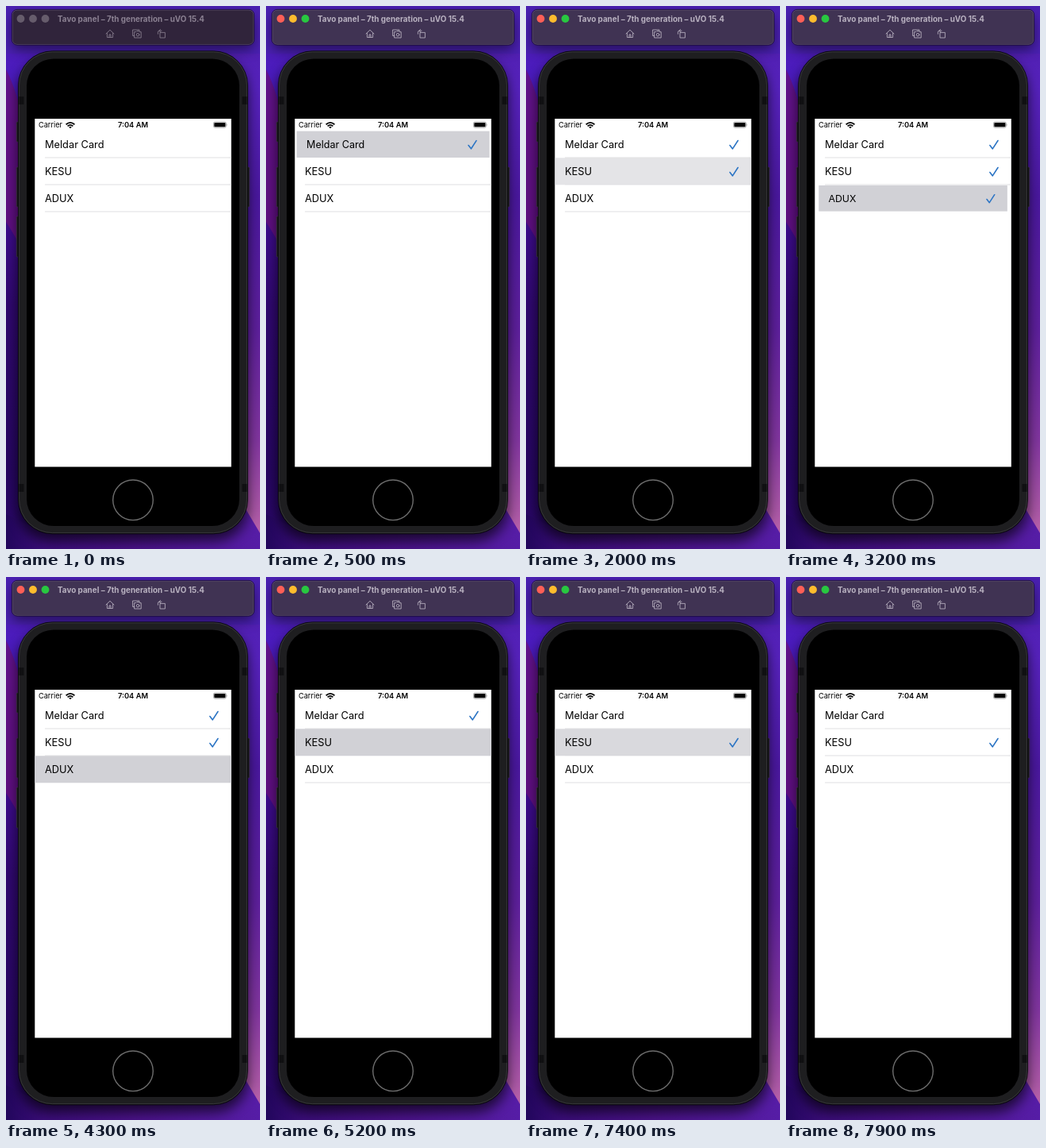
Recreate the animation shown at these times as an HTML page. Size 320 by 684 pixels, loop 8000 ms.

```html
<!DOCTYPE html>
<html lang="en">
<head>
<meta charset="utf-8">
<title>Selectable card list</title>
<style>
  html, body { margin: 0; width: 100%; height: 100%; overflow: hidden; background: #3c149a; }
  svg { display: block; width: 100%; height: 100%; font-family: Inter, Roboto, sans-serif; }
</style>
</head>
<body>
<svg viewBox="0 0 320 684">
  <defs>
    <linearGradient id="left" x2="0" y2="1">
      <stop offset="0" stop-color="#5420b4"/>
      <stop offset=".12" stop-color="#4a1bbc"/>
      <stop offset=".25" stop-color="#43129a"/>
      <stop offset=".4" stop-color="#3d0c8c"/>
      <stop offset=".55" stop-color="#30086f"/>
      <stop offset=".85" stop-color="#260660"/>
      <stop offset="1" stop-color="#2a0768"/>
    </linearGradient>
    <linearGradient id="right" x2="0" y2="1">
      <stop offset="0" stop-color="#4a1ca6"/>
      <stop offset=".15" stop-color="#5622bc"/>
      <stop offset=".35" stop-color="#4a189e"/>
      <stop offset=".6" stop-color="#5e209c"/>
      <stop offset=".8" stop-color="#82369f"/>
      <stop offset=".96" stop-color="#b45fa8"/>
    </linearGradient>
    <linearGradient id="floor">
      <stop offset="0" stop-color="#22065c"/>
      <stop offset=".15" stop-color="#3a0d78"/>
      <stop offset=".5" stop-color="#4a1288"/>
      <stop offset="1" stop-color="#561da6"/>
    </linearGradient>
    <filter id="shadow" x="-20%" y="-50%" width="140%" height="200%">
      <feGaussianBlur stdDeviation="8"/>
    </filter>
  </defs>

  <!-- wallpaper -->
  <rect width="160" height="684" fill="url(#left)"/>
  <rect x="160" width="160" height="684" fill="url(#right)"/>
  <rect y="0" width="320" height="60" fill="#4a20b2"/>
  <path d="M0 80Q9 96 20 136V306Q8 284 0 272Z" fill="#6a107c" opacity=".75"/>
  <path d="M0 640L40 660V600H282L320 664V684H0Z" fill="url(#floor)"/>

  <!-- window bar -->
  <rect x="8" y="12" width="304" height="43" rx="6" opacity=".5" filter="url(#shadow)"/>
  <rect id="bar" x="8" y="5" width="304" height="43.5" rx="6" stroke="#6d607c" stroke-width=".7"/>
  <rect x="7.4" y="4.4" width="305.2" height="44.7" rx="6.6" fill="none" stroke="#120a20" stroke-width=".7"/>
  <g id="lights"><circle cx="18.5" cy="16" r="4.9"/><circle cx="34" cy="16" r="4.9"/><circle cx="49.5" cy="16" r="4.9"/></g>
  <text id="title" x="65" y="19.6" font-size="9.9" font-weight="700">Tavo panel – 7th generation – uVO 15.4</text>
  <g id="icons" fill="none" stroke-width=".9" stroke-linejoin="round" stroke-linecap="round">
    <path d="M126 35L131 30.2L136 35M127.4 34.5V39.5H134.6V34.5M130 39.2V36H132V39.2"/>
    <path d="M161.8 37.5H159.6V30H168V32M162 32.6H163.8L164.8 31.6H167.4L168.4 32.6H170.2V40H162Z"/>
    <circle cx="166.1" cy="36.2" r="1.8"/>
    <path d="M194.4 33.4H200.4V40H194.4ZM191.4 35.2V33.2Q191.4 31.2 193.4 31.2H196M194.6 29.6L192.8 31.2L194.6 32.8"/>
  </g>

  <!-- device -->
  <rect x="15" y="66" width="290" height="608" rx="42" opacity=".65" filter="url(#shadow)"/>
  <g fill="#171619" stroke="#3a373d" stroke-width=".7">
    <rect x="13.3" y="146" width="5" height="25" rx="1.2"/>
    <rect x="13.3" y="203" width="5" height="50" rx="1.2"/>
    <rect x="13.3" y="265" width="5" height="51" rx="1.2"/>
    <rect x="301.7" y="203" width="5" height="50" rx="1.2"/>
  </g>
  <rect x="15.5" y="56.8" width="289" height="608" rx="43" fill="#1e1e20" stroke="#050507" stroke-width=".8"/>
  <rect x="16.6" y="57.9" width="286.8" height="605.7" rx="42" fill="none" stroke="#39393c" stroke-width=".9"/>
  <g fill="#101012">
    <rect x="16.5" y="114" width="6" height="10"/><rect x="297.5" y="114" width="6" height="10"/>
    <rect x="16.5" y="602" width="6" height="10"/><rect x="297.5" y="602" width="6" height="10"/>
  </g>
  <rect x="26" y="66.5" width="268" height="588.5" rx="34"/>
  <circle cx="160" cy="622.3" r="25.3" fill="none" stroke="#6e6e6e" stroke-width="1.4"/>

  <!-- screen -->
  <rect x="36.3" y="142" width="247.5" height="438.5" fill="#fff"/>
  <text x="41" y="153.3" font-size="9.2">Carrier</text>
  <g fill="none" stroke="#000" stroke-width="1.8">
    <path d="M75.6 149.2Q81 144.6 86.4 149.2M77.6 151.4Q81 148.4 84.4 151.4"/>
    <path d="M79.2 152.4Q81 151 82.8 152.4L81 154.2Z" fill="#000" stroke="none"/>
  </g>
  <text x="160" y="153.3" font-size="9.3" font-weight="600" text-anchor="middle">7:04 AM</text>
  <rect x="261.4" y="146" width="16" height="7.2" rx="2" fill="none" stroke="#999" stroke-width=".8"/>
  <rect x="262.3" y="146.9" width="14.2" height="5.4" rx="1.1"/>
  <path d="M278.2 148.5Q279.4 149.7 278.2 150.9Z" fill="#888"/>
  <g id="list"></g>
</svg>
<script>
const LOOP = 8000, ROW_TOP = 157.3, ROW_HEIGHT = 34, PRESSED = 0.95;
const SHRINK = 300, GROW = 105, FADE_DELAY = 125, FADE = 320;

// row, press time, release time, checked after release
const taps = [
  [0, 150, 460, true],
  [1, 1300, 1740, true],
  [2, 2760, 3190, true],
  [2, 3800, 4205, false],
  [1, 4760, 5095, false],
  [0, 5980, 6430, false],
  [1, 6900, 7220, true]
];

const byId = id => document.getElementById(id);
const clamp = v => Math.min(1, Math.max(0, v));
const easeOut = v => 1 - (1 - v) ** 2;

function add(parent, tag, attrs, text = '') {
  const node = document.createElementNS('http://www.w3.org/2000/svg', tag);
  for (const key in attrs) node.setAttribute(key, attrs[key]);
  node.textContent = text;
  return parent.appendChild(node);
}

const rows = ['Meldar Card', 'KESU', 'ADUX'].map((label, i) => {
  const top = ROW_TOP + i * ROW_HEIGHT;
  const line = add(byId('list'), 'rect', { x: 49, y: top + 33.3, width: 234.8, height: 0.8, fill: '#d6d6d9' });
  const group = add(byId('list'), 'g', {});
  const shade = add(group, 'rect', { x: 36.3, y: top, width: 247.5, height: ROW_HEIGHT, fill: '#d1d1d6' });
  add(group, 'text', { x: 49, y: top + 21.9, 'font-size': 12.8 }, label);
  const check = add(group, 'path', {
    d: `M256.9 ${top + 18.2}L260.3 ${top + 22.6}L267 ${top + 12.2}`, fill: 'none',
    stroke: '#2b74c4', 'stroke-width': 1.6, 'stroke-linecap': 'round', 'stroke-linejoin': 'round'
  });
  return { line, group, shade, check, middle: top + ROW_HEIGHT / 2 };
});

function rowState(row, t) {
  const state = { checked: false, scale: 1, shade: 0 };
  for (const [index, press, release, checked] of taps) {
    if (index !== row || t < press) continue;
    const shrink = (1 - PRESSED) * easeOut(clamp((t - press) / SHRINK));
    const back = easeOut(clamp((t - release) / GROW));
    state.scale = 1 - shrink * (1 - back);
    state.shade = 1 - clamp((t - release - FADE_DELAY) / FADE);
    if (t >= release) state.checked = checked;
  }
  return state;
}

function drawBar(active) {
  byId('bar').setAttribute('fill', active ? '#403353' : '#30243b');
  byId('title').setAttribute('fill', active ? '#b9b2c1' : '#8b8192');
  byId('icons').setAttribute('stroke', active ? '#b5adbd' : '#857b8c');
  const colors = active ? ['#fe5f57', '#febc2e', '#28c840'] : Array(3).fill('#665c6c');
  [...byId('lights').children].forEach((light, i) => light.setAttribute('fill', colors[i]));
}

function draw(t) {
  drawBar(t >= 100);
  rows.forEach((row, i) => {
    const { checked, scale, shade } = rowState(i, t);
    row.group.setAttribute('transform',
      `translate(160 ${row.middle}) scale(${scale}) translate(-160 ${-row.middle})`);
    row.shade.setAttribute('opacity', shade);
    row.line.setAttribute('opacity', 1 - shade);
    row.check.setAttribute('opacity', checked ? 1 : 0);
  });
}

const start = performance.now();
function frame() {
  draw((performance.now() - start) % LOOP);
  requestAnimationFrame(frame);
}
frame();
</script>
</body>
</html>
```
